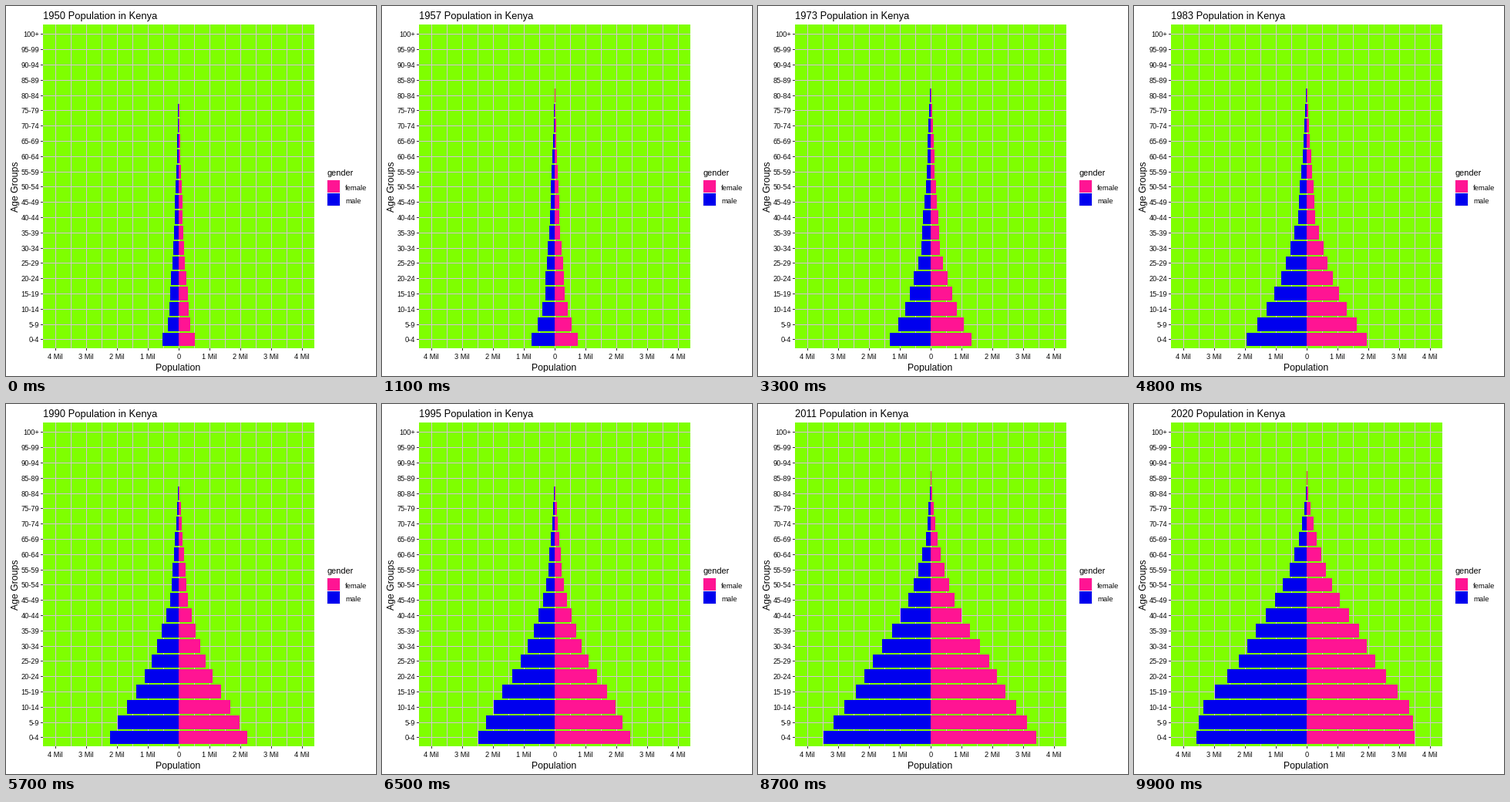
These frames come from a looping animation (480 px wide and 480 px high, 10 s). A matplotlib script:

```python
import matplotlib.pyplot as plt
import numpy as np
from matplotlib.animation import FuncAnimation
from matplotlib.patches import Rectangle

plt.rcParams.update({
    "font.family": "Liberation Sans",
    "text.hinting": "no_autohint",
    "text.hinting_factor": 8,
})

FRAMES = 100
FIRST_YEAR, LAST_YEAR = 1950, 2020
LEFT, RIGHT, TOP, BOTTOM = 48, 400, 24, 444
MID, MILLION = 224, 40
ROW = 19.8
LIME, GRID, PINK, BLUE = "#7fff00", "#d8bfd8", "#ff1493", "#0000ee"
AGES = [f"{a}-{a + 4}" for a in range(0, 100, 5)] + ["100+"]
AGE = 5 * np.arange(len(AGES))

# Size of the youngest group, in pixels, at a few turning points.
BIRTH_YEARS = [1870, 1895, 1905, 1918, 1925, 1935, 1944, 1950, 1964, 1973, 1984, 1996, 2011, 2020]
BIRTHS = [2.5, 5.8, 7.8, 9.2, 10.6, 14, 15.1, 21, 37, 52.5, 78, 98, 136.5, 140]
GENDER_GAP = np.interp(AGE, [0, 20, 65, 85], [-3, 0, 3, 1])


def lengths(year):
    """Each group is what remains of the children born AGE years earlier."""
    child_loss = 0.2 * ((LAST_YEAR - year) / 70) ** 2 * (1 - np.exp(-AGE / 8))
    ageing = 0.54 * (AGE / 60) ** 2.2 + 0.75 * (AGE / 80) ** 14
    female = np.interp(year - AGE, BIRTH_YEARS, BIRTHS) * np.exp(-child_loss - ageing)
    male = female - 0.25 - GENDER_GAP * max(0, (year - 1985) / 35)
    return np.rint(np.maximum(male, 0)), np.rint(female)


fig = plt.figure(figsize=(5, 5), dpi=96, facecolor="white")
ax = fig.add_axes([0, 0, 1, 1])
ax.set(xlim=(0, 480), ylim=(480, 0))
ax.axis("off")


def box(x, y, w, h, color):
    patch = Rectangle((x, y), w, h, fc=color, lw=0, aa=False)
    return ax.add_patch(patch)


def label(x, y, text, size, **kw):
    return ax.text(x, y, text, size=size * 0.75, color="black", va="baseline", **kw)


def row_y(i):
    return int(np.ceil(BOTTOM - 0.13 - (0.6 + i) * ROW))


box(LEFT, TOP, RIGHT - LEFT, BOTTOM - TOP, LIME)
for x in range(MID - 4 * MILLION, RIGHT, MILLION // 2):
    box(x, TOP, 1, BOTTOM - TOP, GRID)
for i, age in enumerate(AGES):
    y = row_y(i)
    box(LEFT, y, RIGHT - LEFT, 1, GRID)
    box(LEFT - 3, y, 3, 1, "#333333")
    label(43, y + 4, age, 9.2, ha="right")
for n in range(-4, 5):
    x = MID + n * MILLION
    box(x, BOTTOM, 1, 3, "#333333")
    label(x, 458, f"{abs(n)} Mil" if n else "0", 9.2, ha="center")

label(MID - 0.5, 473, "Population", 12.2, ha="center")
label(16, 234.5, "Age Groups", 12.2, ha="center", rotation=90, rotation_mode="anchor")
label(417, 220, "gender", 11)
box(416, 226, 18, 34, "#f2f2f2")
for y, name, color in [(226, "female", PINK), (243, "male", BLUE)]:
    box(417, y, 16, 16, color)
    label(440, y + 13, name, 9.4)

title = label(LEFT, 17, "", 13)
bars = []
for i in range(len(AGES)):
    top, bottom = row_y(i + 0.45), row_y(i - 0.45)
    bars.append([box(MID, top, 0, bottom - top, c) for c in (BLUE, PINK)])


def draw(step):
    year = FIRST_YEAR + (LAST_YEAR - FIRST_YEAR) * step / (FRAMES - 1)
    title.set_text(f"{int(year)} Population in Kenya")
    for (left, right), m, f in zip(bars, *lengths(year)):
        left.set_x(MID - m)
        left.set_width(m)
        right.set_width(f)
    return [title, *(bar for pair in bars for bar in pair)]


anim = FuncAnimation(fig, draw, frames=FRAMES, interval=100, repeat=True, repeat_delay=0)
plt.show()
```
